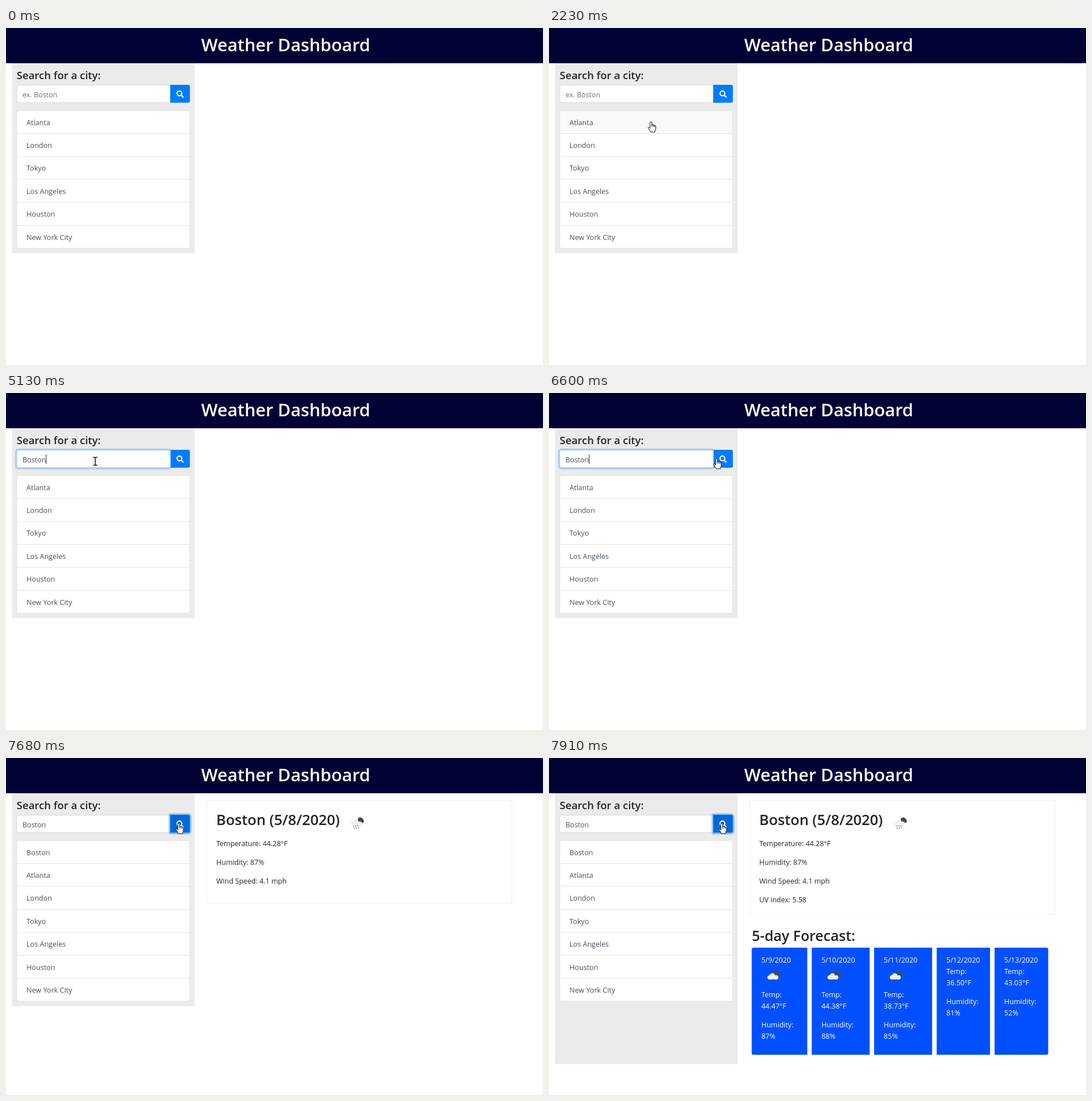
An HTML page with a canvas that plays this animation: 945x593 px, repeating every 8000 ms.

```html
<!DOCTYPE html>
<html lang="en">
<head>
<meta charset="utf-8">
<title>Weather Dashboard</title>
<style>
html, body { margin: 0; width: 100%; height: 100%; overflow: hidden; background: #fff; }
canvas { display: block; width: 945px; height: 593px; }
</style>
</head>
<body>
<canvas id="stage"></canvas>
<script>
const W = 945, H = 593, LOOP = 8000;
const canvas = document.getElementById('stage');
const ctx = canvas.getContext('2d');
const dpr = window.devicePixelRatio || 1;
canvas.width = W * dpr;
canvas.height = H * dpr;

const FAMILY = '"Open Sans", "Noto Sans", sans-serif';
const INK = '#212529', MUTED = '#495057', ROW = 40.4, LIST_TOP = 145.2, HEADER = 62;
const CITIES = ['Atlanta', 'London', 'Tokyo', 'Los Angeles', 'Houston', 'New York City'];
const KEYS = [4110, 4430, 4580, 4810, 4980, 5130];
const FORECAST = [
  { x: 356.7, w: 97.8, date: '5/9/2020', temp: '44.47', hum: 87, icon: true },
  { x: 462.4, w: 101.9, date: '5/10/2020', temp: '44.38', hum: 88, icon: true },
  { x: 572.1, w: 102.1, date: '5/11/2020', temp: '38.73', hum: 85, icon: true },
  { x: 682.3, w: 93.8, date: '5/12/2020', temp: '36.50', hum: 81 },
  { x: 784.1, w: 94.4, date: '5/13/2020', temp: '43.03', hum: 52 }
];
const PRESS = 3420, FOCUS = 3500, HOVER = 6600, CLICK = 7220;
const LISTED = 7380, CARD = 7600, ICON = 7680, DAYS = 7740, UV = 7910;

const clamp = v => Math.max(0, Math.min(1, v));
const smooth = p => p * p * (3 - 2 * p);
const easeOut = p => 1 - (1 - p) ** 2;
const lerp = (a, b, p) => a + (b - a) * p;
const mix = (a, b, p) => `rgb(${a.map((v, i) => Math.round(lerp(v, b[i], p)))})`;

// Pointer moves, sampled in equal steps like a screen recording
const MOVES = [
  { from: 1360, to: 1590, steps: 4, a: [242, 640], b: [212, 386], ease: easeOut },
  { from: 1910, to: 2230, steps: 5, a: [212, 386], b: [179.5, 164.5], ease: smooth },
  { from: 2710, to: 3100, steps: 6, a: [179.5, 164.5], b: [157, 120.3], ease: smooth },
  { from: 5910, to: 6760, steps: 12, a: [157, 120.3], b: [304, 114.5], ease: easeOut }
];

function pointerAt(t) {
  let pos = MOVES[0].a;
  for (const m of MOVES) {
    if (t < m.from) break;
    const k = Math.floor((t - m.from) / (m.to - m.from) * (m.steps - 1) + 0.001) + 1;
    const p = m.ease(clamp(k / m.steps));
    pos = [lerp(m.a[0], m.b[0], p), lerp(m.a[1], m.b[1], p)];
  }
  return pos;
}

function text(str, x, y, color = INK, size = 12.5, weight = 400) {
  ctx.font = `${weight} ${size}px ${FAMILY}`;
  ctx.fillStyle = color;
  ctx.fillText(str, x, y);
}

function rect(x, y, w, h, color) {
  ctx.fillStyle = color;
  ctx.fillRect(x, y, w, h);
}

function box(x, y, w, h, radii, fill, stroke, line = 0.9) {
  ctx.beginPath();
  ctx.roundRect(x, y, w, h, radii);
  if (fill) { ctx.fillStyle = fill; ctx.fill(); }
  if (stroke) { ctx.strokeStyle = stroke; ctx.lineWidth = line; ctx.stroke(); }
}

function disc(x, y, r, color) {
  ctx.beginPath();
  ctx.arc(x, y, r, 0, Math.PI * 2);
  ctx.fillStyle = color;
  ctx.fill();
}

function cloud(x, y, s, color) {
  disc(x - 6 * s, y + 2.4 * s, 3.8 * s, color);
  disc(x - s, y, 5 * s, color);
  disc(x + 6 * s, y + 2.4 * s, 3.8 * s, color);
  rect(x - 6 * s, y + s, 12 * s, 5.2 * s, color);
}

function weather(x, y, front, drops) {
  disc(x + 5.4, y - 4.6, 4.6, '#48484a');
  disc(x + 8.4, y - 2.6, 3.4, '#48484a');
  cloud(x - 1.2, y - 0.4, 0.98, front);
  for (let i = 0; i < drops; i++) {
    const col = i % 3, row = Math.floor(i / 3);
    disc(x - 6 + col * 3.6 + row, y + 6.6 + row * 3.4 - col * 0.4, 0.9, '#555');
  }
}

function search(t) {
  const focus = t < CLICK ? clamp((t - FOCUS + 60) / 150) * (t >= FOCUS) : 0;
  const hover = clamp((t - HOVER) / 150);
  const pressed = t >= CLICK && t < CLICK + 80;
  const ring = clamp((t - CLICK) / 150);

  const blue = pressed ? '#0062cc' : mix([0, 123, 255], [0, 105, 217], hover);
  const field = () => {
    if (focus) box(17.2, 98.8, 273.6, 34.2, 4.5, null, `rgba(0,123,255,${0.25 * focus})`, 2.8);
    box(18.9, 100.5, 270.6, 30.8, [3.3, 0, 0, 3.3], '#fff', mix([206, 212, 218], [128, 189, 255], focus));
  };
  const button = () => {
    if (ring) box(287.7, 98.8, 37.2, 34, [2, 4.5, 4.5, 2], null, `rgba(38,143,255,${0.5 * ring})`, 2.8);
    box(289, 100.1, 34.6, 31.4, [0, 3.3, 3.3, 0], blue);
  };
  if (focus) { button(); field(); } else { field(); button(); }

  ctx.strokeStyle = '#fff';
  ctx.lineWidth = 2.1;
  ctx.beginPath();
  ctx.arc(305.2, 115.1, 4.2, 0, Math.PI * 2);
  ctx.stroke();
  ctx.lineWidth = 2.6;
  ctx.beginPath();
  ctx.moveTo(308.5, 118.4);
  ctx.lineTo(312.2, 122.1);
  ctx.stroke();

  const typed = 'Boston'.slice(0, KEYS.filter(k => t >= k).length);
  if (typed) text(typed, 29, 121.6, MUTED);
  else text('ex. Boston', 29, 121.6, '#6c757d');

  const lit = t < 3940 || (t >= KEYS[0] && t < 5670) || (t >= 6200 && t < 6760);
  if (focus && lit) {
    ctx.font = `400 12.5px ${FAMILY}`;
    rect(29 + ctx.measureText(typed).width, 108, 1, 17, '#222');
  }
}

function list(t, mx, my) {
  const items = t >= LISTED ? ['Boston', ...CITIES] : CITIES;
  const over = mx > 18.5 && mx < 323.5 ? Math.floor((my - LIST_TOP) / ROW) : -1;
  box(18.9, LIST_TOP, 304.4, items.length * ROW, 3.3, '#fff');
  items.forEach((name, i) => {
    const y = LIST_TOP + i * ROW;
    if (i === over) rect(19, y, 304.2, ROW, '#f8f9fa');
    if (i) rect(19, y - 0.4, 304.2, 0.9, '#dfdfdf');
    text(name, 36, y + 25.4, MUTED, 12.6);
  });
  box(18.9, LIST_TOP, 304.4, items.length * ROW, 3.3, null, '#dfdfdf');
  return over >= 0 && over < items.length;
}

function current(t) {
  box(352.9, 74.6, 537.4, t >= UV ? 200.6 : 180.6, 0, '#fff', '#ebebeb');
  text('Boston (5/8/2020)', 370, 117.8, INK, 25.6, 600);
  if (t >= ICON) weather(618, 113.6, '#f0f0f0', 6);
  const lines = ['Temperature: 44.28°F', 'Humidity: 87%', 'Wind Speed: 4.1 mph'];
  if (t >= UV) lines.push('UV index: 5.58');
  lines.forEach((line, i) => text(line, 370, 154.6 + i * 33));
}

function forecast(dy) {
  ctx.save();
  ctx.translate(0, dy);
  text('5-day Forecast:', 357, 322.3, INK, 25.1, 600);
  FORECAST.forEach((d, i) => {
    const l = i === 0 ? 3.3 : 0, r = i === 4 ? 3.3 : 0;
    box(d.x, 333.8, d.w, 188.4, [l, r, r, l], '#0050ff');
    const x = d.x + 17, y = d.icon ? 421.2 : 380.2;
    text(d.date, x, 360, '#fff');
    if (d.icon) weather(x + 21.5, 384, '#f2f2f2', 3);
    text('Temp:', x, y, '#fff');
    text(d.temp + '°F', x, y + 19.8, '#fff');
    text('Humidity:', x, y + 52.8, '#fff');
    text(d.hum + '%', x, y + 72.6, '#fff');
  });
  ctx.restore();
}

const HAND = new Path2D('M-1.6 10V1.6Q0-.8 1.6 1.6V6Q3.4 4.4 4 6.6Q5.8 5.2 6.3 7.3Q8.2 6.5 8.5 8.8L8.2 13.2Q7.5 15.6 6.7 18.6H-.6Q-2 15.4-4.5 12.4Q-6 10-4 9.8Q-2.6 10-1.6 12Z');
const KNUCKLES = new Path2D('M1.6 5V9.5M4 6.4V9.5M6.3 7.2V9.8');
const ARROW = new Path2D('M0 0V16L3.7 12.6L6.2 18.2L8.4 17.2L6 11.7L11 11.3Z');
const BEAM = new Path2D('M-3.8-7H-1Q0-7 0-6V5.6Q0 6.6-1 6.6H-3.8M3.8-7H1Q0-7 0-6M0 5.6Q0 6.6 1 6.6H3.8');

function pointer(kind, x, y, click) {
  if (click) disc(x - 1, y - 0.6, 9.7, 'rgba(255,255,0,.65)');
  ctx.save();
  ctx.translate(x, y);
  ctx.lineWidth = 1;
  ctx.strokeStyle = '#111';
  if (kind === 'beam') {
    ctx.lineWidth = 1.5;
    if (click) ctx.strokeStyle = '#4c4c08';
    ctx.stroke(BEAM);
  } else {
    const shape = kind === 'hand' ? HAND : ARROW;
    ctx.fillStyle = '#fff';
    ctx.fill(shape);
    ctx.stroke(shape);
    if (kind === 'hand') ctx.stroke(KNUCKLES);
  }
  ctx.restore();
}

function draw(t) {
  const [mx, my] = pointerAt(t);
  ctx.setTransform(dpr, 0, 0, dpr, 0, 0);
  rect(0, 0, W, H, '#fff');
  rect(0, 0, W, HEADER, '#020235');
  text('Weather Dashboard', 343.5, 41, '#fff', 30.8, 600);

  const bottom = t >= UV ? 538.4 : t >= DAYS ? 518.4 : t >= LISTED ? 436.6 : 396.2;
  rect(10.4, HEADER, 321.6, bottom - HEADER, '#ebebeb');
  text('Search for a city:', 18.8, 89.8, INK, 18.5, 600);
  search(t);
  const onItem = list(t, mx, my);

  if (t >= CARD) current(t);
  if (t >= DAYS) forecast(t >= UV ? 0 : -20);

  const inBar = my > 100 && my < 131.5;
  const kind = onItem || (inBar && mx > 289) ? 'hand' : inBar && mx > 18.5 ? 'beam' : 'arrow';
  const click = [PRESS, CLICK].some(at => t >= at && t < at + 80);
  if (t >= MOVES[0].from) pointer(kind, mx, my, click);
}

function frame() {
  draw(performance.now() % LOOP);
  requestAnimationFrame(frame);
}
frame();
</script>
</body>
</html>
```
